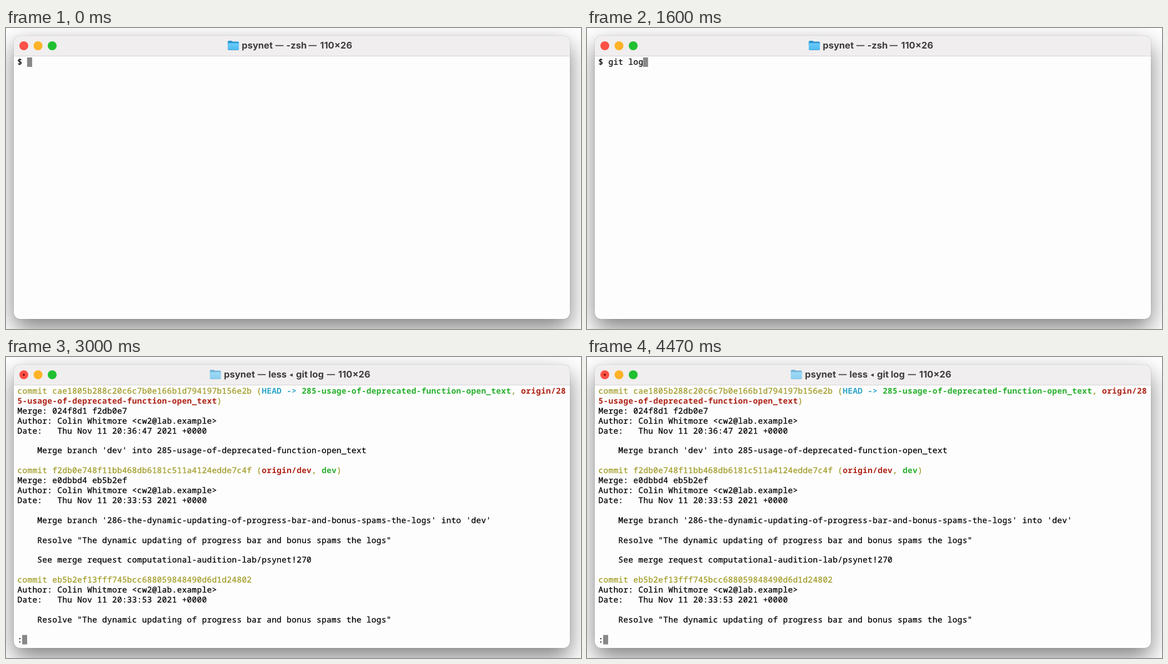
An HTML page that plays this animation: 1033 by 542 pixels, repeating every 4540 ms.

```html
<!DOCTYPE html>
<html lang="en">
<head>
<meta charset="utf-8">
<title>Terminal: git log</title>
<style>
  :root { --loop: 4540ms step-end infinite; --cw: 8.964px; --row: 17.9px; }
  html, body { margin: 0; width: 100%; height: 100%; overflow: hidden; background: #fff; }
  .stage { position: relative; width: 1033px; height: 542px; overflow: hidden; }
  .window {
    position: absolute; left: 14px; top: 14px; width: 998.5px; height: 510px;
    border-radius: 11px; background: #fdfdfd;
    box-shadow: 0 0 1px rgba(0,0,0,.65), 0 17px 42px rgba(0,0,0,.5);
  }
  .bar {
    height: 36px; border-radius: 11px 11px 0 0;
    background: #f0eeee; border-bottom: 1px solid #d5d3d3;
  }
  svg, .screen { position: absolute; left: 0; top: 0; width: 1033px; height: 542px; }
  .title { font: 700 16.5px Inter, sans-serif; fill: #3e3c3d; text-rendering: geometricPrecision; }
  .dash { font-size: 14.5px; }
  pre {
    position: absolute; left: 20.5px; top: 53px; margin: 0;
    font: 14.4px/var(--row) "Noto Sans Mono", "DejaVu Sans Mono", monospace;
    letter-spacing: .324px; color: #000; -webkit-text-stroke: .3px;
    font-variant-ligatures: none; text-rendering: geometricPrecision;
  }
  b { font-weight: 700; -webkit-text-stroke: 0; }
  .y { color: #a09b26; }
  .c { color: #2ba4c6; }
  .g { color: #27b02c; }
  .r { color: #af2418; }
  .cursor {
    position: absolute; left: 20.2px; top: 52.6px;
    width: 9px; height: 17.9px; background: #888;
  }
  .typed {
    display: inline-block; overflow: hidden; vertical-align: top;
    height: var(--row); animation: type var(--loop);
  }
  .mark { animation: entered var(--loop); }
  .mark pre { color: #999; -webkit-text-stroke: 0; }
  .shell { animation: leave var(--loop); }
  .pager { animation: enter var(--loop); }
  .shell .cursor { animation: move var(--loop); }
  .pager .cursor { transform: translate(var(--cw), calc(25 * var(--row))); }

  @keyframes type {
    0%     { width: 0; }
    11.67% { width: var(--cw); }
    13.21% { width: calc(2 * var(--cw)); }
    16.07% { width: calc(3 * var(--cw)); }
    19.16% { width: calc(4 * var(--cw)); }
    27.97% { width: calc(5 * var(--cw)); }
    30.83% { width: calc(6 * var(--cw)); }
    33.7%, 100% { width: calc(7 * var(--cw)); }
  }
  @keyframes move {
    0%     { transform: translateX(calc(2 * var(--cw))); }
    11.67% { transform: translateX(calc(3 * var(--cw))); }
    13.21% { transform: translateX(calc(4 * var(--cw))); }
    16.07% { transform: translateX(calc(5 * var(--cw))); }
    19.16% { transform: translateX(calc(6 * var(--cw))); }
    27.97% { transform: translateX(calc(7 * var(--cw))); }
    30.83% { transform: translateX(calc(8 * var(--cw))); }
    33.7%  { transform: translateX(calc(9 * var(--cw))); }
    45.59%, 100% { transform: translateY(var(--row)); }
  }
  @keyframes entered { 0% { opacity: 0; } 45.59%, 100% { opacity: 1; } }
  @keyframes leave { 0% { opacity: 1; } 51.32%, 100% { opacity: 0; } }
  @keyframes enter { 0% { opacity: 0; } 51.32%, 100% { opacity: 1; } }
</style>
</head>
<body>
<div class="stage">
  <div class="window"><div class="bar"></div></div>

  <svg viewBox="0 0 1033 542">
    <defs>
      <linearGradient id="front" x2="0" y2="1">
        <stop stop-color="#6accfb"/><stop offset="1" stop-color="#4fb9ef"/>
      </linearGradient>
      <g id="folder">
        <path d="M0 3.2Q0 1.2 2 1.2H6.4Q7.4 1.2 8.2 2L9 2.8H18Q20 2.8 20 4.8V9H0Z" fill="#2a94cf"/>
        <path d="M0 5.6H20V16Q20 18 18 18H2Q0 18 0 16Z" fill="url(#front)"/>
        <path d="M.3 16Q.5 17.8 2 17.8H18Q19.5 17.8 19.7 16" fill="none" stroke="#3a9fd6" stroke-width=".8"/>
      </g>
    </defs>
    <circle cx="32" cy="32" r="8" fill="#fe5147"/>
    <circle cx="57.5" cy="32" r="8" fill="#fdb227"/>
    <circle cx="83" cy="32" r="8" fill="#20c031"/>
  </svg>

  <div class="screen shell">
    <svg class="title" viewBox="0 0 1033 542">
      <use href="#folder" x="398.4" y="21.7"/>
      <text y="37"><tspan x="423.5">psynet</tspan><tspan x="503.5">-zsh</tspan><tspan x="564.3">110×26</tspan></text>
      <text y="36.4" class="dash"><tspan x="484">—</tspan><tspan x="543.5">—</tspan></text>
    </svg>
    <pre>$ <span class="typed">git log</span></pre>
    <div class="mark">
      <pre style="left:12px">[</pre>
      <pre style="left:1005px">]</pre>
    </div>
    <div class="cursor"></div>
  </div>

  <div class="screen pager">
    <svg class="title" viewBox="0 0 1033 542">
      <use href="#folder" x="366.2" y="21.7" opacity=".62"/>
      <circle cx="32" cy="32" r="2.1" fill="#8d0f0b"/>
      <text y="37"><tspan x="391.5">psynet</tspan><tspan x="471.5">less</tspan><tspan x="521">git log</tspan><tspan x="596.8">110×26</tspan></text>
      <text y="36.4" class="dash"><tspan x="452">—</tspan><tspan x="576.5">—</tspan></text>
      <path d="M509.5 32.5L515 29.5V35.5Z"/>
    </svg>
    <pre><span class="y">commit cae1805b288c20c6c7b0e166b1d794197b156e2b (<b class="c">HEAD -&gt; </b><b class="g">285-usage-of-deprecated-function-open_text</b>, <b class="r">origin/28
5-usage-of-deprecated-function-open_text</b>)</span>
Merge: 024f8d1 f2db0e7
Author: Colin Whitmore &lt;cw2@lab.example&gt;
Date:   Thu Nov 11 20:36:47 2021 +0000

    Merge branch 'dev' into 285-usage-of-deprecated-function-open_text

<span class="y">commit f2db0e748f11bb468db6181c511a4124edde7c4f (<b class="r">origin/dev</b>, <b class="g">dev</b>)</span>
Merge: e0dbbd4 eb5b2ef
Author: Colin Whitmore &lt;cw2@lab.example&gt;
Date:   Thu Nov 11 20:33:53 2021 +0000

    Merge branch '286-the-dynamic-updating-of-progress-bar-and-bonus-spams-the-logs' into 'dev'

    Resolve "The dynamic updating of progress bar and bonus spams the logs"

    See merge request computational-audition-lab/psynet!270

<span class="y">commit eb5b2ef13fff745bcc688059848490d6d1d24802</span>
Author: Colin Whitmore &lt;cw2@lab.example&gt;
Date:   Thu Nov 11 20:33:53 2021 +0000

    Resolve "The dynamic updating of progress bar and bonus spams the logs"

:</pre>
    <div class="cursor"></div>
  </div>
</div>
</body>
</html>
```
